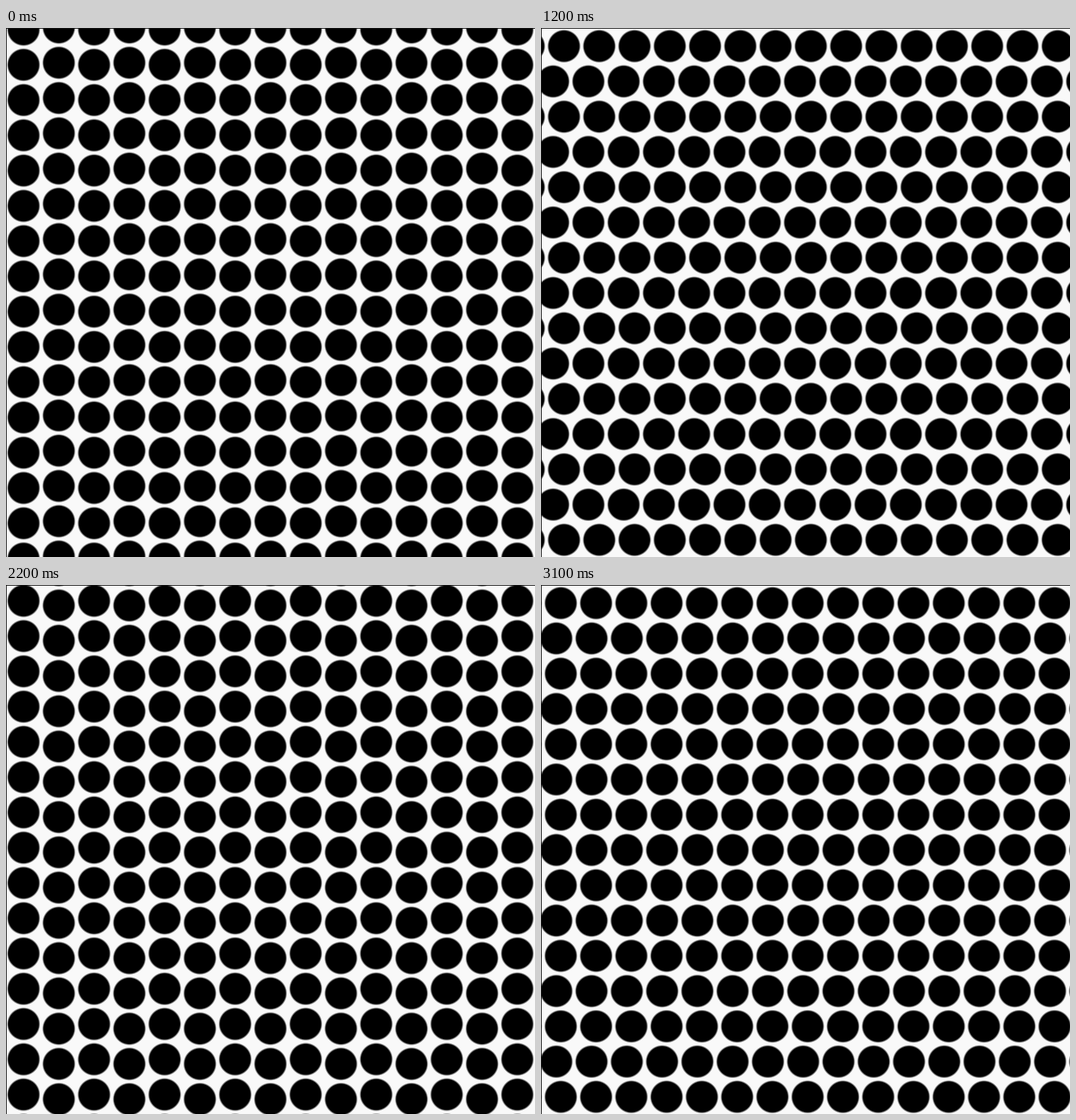
Write an HTML page with a canvas that moves like this. It is 748 px wide and 748 px high and loops after 3200 ms.

```html
<!DOCTYPE html>
<html lang="en">
<head>
<meta charset="utf-8">
<title>Sliding dots</title>
<style>
  html, body { margin: 0; width: 100%; height: 100%; overflow: hidden; background: #f9f9f9; }
  canvas { display: block; }
</style>
</head>
<body>
<canvas id="stage" width="748" height="748"></canvas>
<script>
const SIZE = 748, COUNT = 15, PITCH = SIZE / COUNT;
const ORIGIN = { x: 24.85, y: 25.65 };
const LOOP = 3200, STEP = 100;

// [time in ms, slides completed]; vertical and horizontal slides alternate
const PROGRESS = [
  [0, 0.529], [400, 0.968], [800, 1.403], [1200, 1.846],
  [2000, 2.714], [2500, 3.265], [3100, 3.936]
];

const ctx = document.getElementById("stage").getContext("2d");
const softDot = ctx.createRadialGradient(0, 0, 21.2, 0, 0, 23.6);
softDot.addColorStop(0, "rgba(0,0,0,1)");
softDot.addColorStop(1, "rgba(0,0,0,0)");

function progressAt(time) {
  const i = Math.max(1, PROGRESS.findIndex(([t]) => t >= time));
  const [t0, p0] = PROGRESS[i - 1], [t1, p1] = PROGRESS[i];
  return p0 + (p1 - p0) * (time - t0) / (t1 - t0);
}

function dot(x, y) {
  ctx.save();
  ctx.translate(x, y);
  ctx.fillStyle = softDot;
  ctx.fillRect(-24, -24, 48, 48);
  ctx.restore();
}

function draw(time) {
  const progress = progressAt(time);
  const vertical = Math.floor(progress) % 2 === 0;
  const shift = (progress % 1) * PITCH * (vertical ? 1 : -1);

  ctx.fillStyle = "#f9f9f9";
  ctx.fillRect(0, 0, SIZE, SIZE);

  // Neighbouring lanes slide in opposite directions.
  for (let lane = 0; lane < COUNT; lane++) {
    const offset = lane % 2 ? -shift : shift;
    for (let k = -2; k <= COUNT + 1; k++) {
      const along = k * PITCH + offset, across = lane * PITCH;
      if (vertical) dot(ORIGIN.x + across, ORIGIN.y + along);
      else dot(ORIGIN.x + along, ORIGIN.y + across);
    }
  }

  ctx.fillStyle = "#111";
  ctx.fillRect(0, 0, SIZE, 1);
  ctx.fillRect(0, 0, 1, SIZE);
}

const start = performance.now();
function tick() {
  const time = (performance.now() - start) % LOOP;
  draw(Math.floor(time / STEP) * STEP);
  requestAnimationFrame(tick);
}
tick();
</script>
</body>
</html>
```
